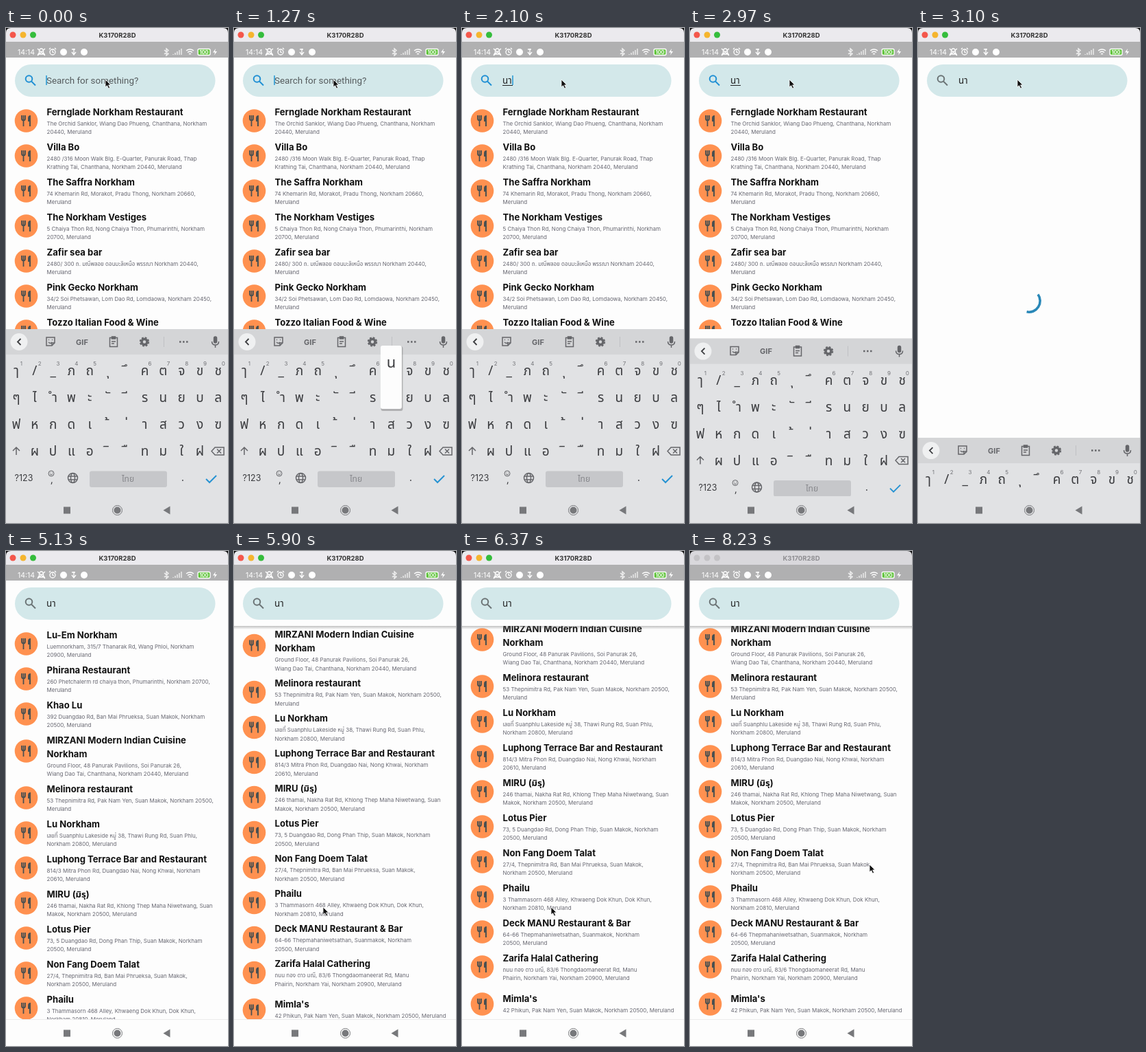
These frames come from a looping animation (324x720 px, 8260 ms). An HTML page:

```html
<!DOCTYPE html>
<html lang="en">
<head>
<meta charset="utf-8">
<title>Restaurant search</title>
<style>
  html, body { margin: 0; width: 100%; height: 100%; overflow: hidden; background: #000; }
  svg { display: block; width: 324px; height: 720px; font-family: Inter, "Noto Sans Thai", "Noto Sans", sans-serif; }
  .name { font-size: 13.1px; font-weight: 700; fill: #111; }
  .addr { font-size: 8px; fill: #666670; }
  .key { font: 19px "Noto Sans Thai", "Noto Sans", sans-serif; fill: #3c3d40; text-anchor: middle; }
  .num { font-size: 8px; fill: #727377; text-anchor: middle; }
  .line { fill: none; stroke: #65666a; stroke-width: 1.5; }
  .field { font: 13.4px Roboto, "Noto Sans Thai", "Noto Sans", sans-serif; }
</style>
</head>
<body>
<svg viewBox="0 0 324 720">
  <defs>
    <clipPath id="aboveKeys"><path d="M0 43H324V438H0z"/></clipPath>
    <clipPath id="aboveNav"><path d="M0 43H324V681H0z"/></clipPath>
    <linearGradient id="fade" x2="0" y2="1"><stop stop-color="#666" stop-opacity=".4"/><stop offset="1" stop-color="#666" stop-opacity="0"/></linearGradient>
    <g id="dish">
      <circle r="16.8" fill="#ff9150"/>
      <path d="M-6.500-8v5q0 2.500 2.500 2.500t2.500-2.500v-5M-4-8V8" fill="none" stroke="#4a5050" stroke-width="1.800"/>
      <path d="M2.500-4q0-4 4-4V8H4.500V1h-2z" fill="#4a5050"/>
    </g>
  </defs>
  <rect width="324" height="720" fill="#fdfdfd"/>
  <g id="first" clip-path="url(#aboveKeys)"></g>
  <g clip-path="url(#aboveNav)"><g id="results"></g></g>
  <path id="spinner" fill="none" stroke="#2a88b8" stroke-width="3.600"/>

  <g id="shadow"><rect y="109" width="324" height="5" fill="url(#fade)"/></g>
  <rect y="43" width="324" height="66" fill="#fdfdfd"/>
  <rect x="13" y="53" width="292.500" height="47" rx="23.500" fill="#d3e8ea"/>
  <g id="lens" fill="none" stroke-width="2"><circle cx="33.500" cy="74" r="4.800"/><path d="M37 77.500l6 6"/></g>
  <text id="query" class="field" x="59" y="81"></text>
  <path id="underline" stroke="#222"/>
  <path id="caret" stroke="#2196d3" stroke-width="1.500" d="M0 69v14"/>

  <rect y="20" width="324" height="23" fill="#b0b0b1"/>
  <g fill="none" stroke="#fff" stroke-width="1.300">
    <path d="M47 38h9l-1.500-2v-3q-.5-3-3-3t-3 3v3zM46 30l11 10M57 30l-11 10"/>
    <circle cx="68" cy="35" r="4"/><path d="M68 32.500V35l2 1M63 31l2-2M73 31l-2-2M99 30v9M96 35l3 4 3-4M96 31h5"/>
    <path d="M231 32l6 5.500-3 2.500V30l3 2.500-6 5.500M244 39v-1M247 39v-3M250 39v-5M253 39v-7M256 39v-9" stroke-opacity=".85"/>
    <path d="M263 33q5.500-4 11 0M265 35.500q3.500-2.500 7 0M267 38q1.500-1 3 0"/>
    <rect x="280" y="30.500" width="18" height="9" rx="2" fill="#62c43e"/>
  </g>
  <g fill="#fff">
    <text x="17" y="38.500" font-size="10.500">14:14</text>
    <circle cx="84" cy="35" r="5"/><circle cx="114" cy="35" r="5"/>
    <text x="289" y="38" font-size="7.500" font-weight="600" text-anchor="middle">100</text>
    <path d="M306 30l-4 5.500h3l-1 4 4-5.500h-3z"/>
  </g>

  <path d="M0 0H324V20H0z" fill="#111"/>
  <path id="bar" d="M0 20V7Q0 0 7 0H317Q324 0 324 7V20z"/>
  <g id="lights"><circle cx="10" cy="10" r="4.500"/><circle cx="25" cy="10" r="4.500"/><circle cx="39.500" cy="10" r="4.500"/></g>
  <text id="device" x="162.500" y="13.500" font-size="9.500" font-weight="700" text-anchor="middle">K3170R28D</text>

  <g id="keyboard">
    <rect y="438" width="324" height="282" fill="#e1e2e4"/>
    <rect y="438" width="324" height="37" fill="#d4d5d7"/>
    <circle cx="19" cy="456.500" r="12.500" fill="#eff0f1"/>
    <g class="line">
      <path d="M21.500 452l-4.500 4.500 4.500 4.500" stroke="#3c3d40" stroke-width="1.800"/>
      <path d="M59 450h12v8l-4 4h-8zM67 462v-4h4M62 457q3 3 5 0M62 453.500h1M67 453.500h1"/>
      <path d="M151.500 450.500h11v13h-11zM154.500 449h5v3h-5zM154 456h6M154 459h4"/>
      <circle cx="202" cy="456.500" r="4" stroke-width="3.500"/><circle cx="202" cy="456.500" r="6.200" stroke-width="2" stroke-dasharray="2.800 2.070"/>
      <path d="M230.500 449v15" stroke="#c0c1c4" stroke-width="1"/>
      <path d="M253 456.500h2.500M258 456.500h2.500M263 456.500h2.500" stroke-width="2.500"/>
      <rect x="303.500" y="449" width="4" height="9" rx="2" fill="#65666a"/><path d="M300.500 456q0 5 5 5t5-5M305.500 461v4"/>
      <path d="M15 621v-11M10 615l5-5 5 5M305 610h13v11h-13l-5-5.500zM308 612.500l6 6M314 612.500l-6 6"/>
      <circle cx="66" cy="648" r="4" stroke-width="1"/><path d="M64 649q2 2 4 0M64.500 646.500v1M67.500 646.500v1" stroke-width="1"/>
      <circle cx="97.500" cy="654.500" r="7"/><ellipse cx="97.500" cy="654.500" rx="3" ry="7"/><path d="M91 652h13M91 657h13"/>
      <path d="M292 656l5 5 10-10" stroke="#2793d2" stroke-width="2"/>
    </g>
    <text x="111" y="460.500" font-size="11" font-weight="700" fill="#65666a" text-anchor="middle">GIF</text>
    <rect x="122" y="644.500" width="113" height="23.500" rx="3" fill="#c6c7ca"/>
    <text x="178" y="660" font-size="12" fill="#85868a" text-anchor="middle">ไทย</text>
    <text x="26" y="659" font-size="12.500" fill="#3c3d40" text-anchor="middle">?123</text>
    <text class="key" x="67" y="662" style="font-size:14px">,</text><text class="key" x="258" y="659" style="font-size:14px">.</text>
    <g id="keys"></g>
  </g>
  <g id="popup">
    <rect x="-15" y="-24" width="32" height="94" rx="3" fill="#555" opacity=".35"/>
    <rect x="-15.500" y="-25" width="31" height="92" rx="3" fill="#fdfdfd"/>
    <text class="key" y="7" style="font-size:22px"></text>
  </g>

  <rect id="nav" y="681" width="324" height="39"/>
  <path id="navLine" d="M0 681.500H324" stroke="#ebebec"/>
  <g fill="#77787b">
    <rect x="84" y="696.500" width="10" height="10"/>
    <circle cx="162.500" cy="701.500" r="5"/><circle cx="162.500" cy="701.500" r="7" fill="none" stroke="#77787b"/>
    <path d="M229.500 701.500l10-6v12z"/>
  </g>
  <path id="pointer" d="M0 0V11l2.600-2.300 2 4.200 2-1-2-4H8z" fill="#111" stroke="#fff" stroke-width=".8"/>
</svg>
<script>
const $ = id => document.getElementById(id);
const LOOP = 8260;
const END = ", Meruland";

// Each entry: name lines split by "|", then address lines.
const firstRows = [
  ["Fernglade Norkham Restaurant", "The Orchid Sanklor, Wiang Dao Phueng, Chanthana, Norkham", "20440" + END],
  ["Villa Bo", "2480 /316 Moon Walk Blg. E-Quarter, Panurak Road, Thap", "Krathing Tai, Chanthana, Norkham 20440" + END],
  ["The Saffra Norkham", "74 Khemarin Rd, Morakot, Pradu Thong, Norkham 20660,", "Meruland"],
  ["The Norkham Vestiges", "5 Chaiya Thon Rd, Nong Chaiya Thon, Phumarinthi, Norkham", "20700" + END],
  ["Zafir sea bar", "2480/ 300 ถ. มณีพลอย ดอนมะลิเหนือ พรรณา Norkham 20440,", "Meruland"],
  ["Pink Gecko Norkham", "34/2 Soi Phetsawan, Lom Dao Rd, Lomdaowa, Norkham 20450,", "Meruland"],
  ["Tozzo Italian Food & Wine", "", ""]
];
const resultRows = [
  ["Lu-Em Norkham", "Luemnorkham, 315/7 Thanarak Rd, Wang Phloi, Norkham", "20900" + END],
  ["Phirana Restaurant", "260 Phetchalerm rd chaiya thon, Phumarinthi, Norkham 20700,", "Meruland"],
  ["Khao Lu", "392 Duangdao Rd, Ban Mai Phrueksa, Suan Makok, Norkham", "20500" + END],
  ["MIRZANI Modern Indian Cuisine|Norkham", "Ground Floor, 48 Panurak Pavilions, Soi Panurak 26,", "Wiang Dao Tai, Chanthana, Norkham 20440" + END],
  ["Melinora restaurant", "53 Thepnimitra Rd, Pak Nam Yen, Suan Makok, Norkham 20500,", "Meruland"],
  ["Lu Norkham", "เลขที่ Suanphlu Lakeside หมู่ 38, Thawi Rung Rd, Suan Phlu,", "Norkham 20800" + END],
  ["Luphong Terrace Bar and Restaurant", "814/3 Mitra Phon Rd, Duangdao Nai, Nong Khwai, Norkham", "20610" + END],
  ["MIRU (มิรุ)", "246 thamai, Nakha Rat Rd, Khlong Thep Maha Niwetwang, Suan", "Makok, Norkham 20500" + END],
  ["Lotus Pier", "73, 5 Duangdao Rd, Dong Phan Thip, Suan Makok, Norkham", "20500" + END],
  ["Non Fang Doem Talat", "27/4, Thepnimitra Rd, Ban Mai Phrueksa, Suan Makok,", "Norkham 20500" + END],
  ["Phailu", "3 Thammasorn 468 Alley, Khwaeng Dok Khun, Dok Khun,", "Norkham 20810" + END],
  ["Deck MANU Restaurant & Bar", "64-66 Thepmahaniwetsathan, Suanmakok, Norkham", "20500" + END],
  ["Zarifa Halal Cathering", "ถนน ทอง ดาว มณี, 83/6 Thongdaomaneerat Rd, Manu", "Phairin, Norkham Yai, Norkham 20900" + END],
  ["Mimla's", "42 Phikun, Pak Nam Yen, Suan Makok, Norkham 20500" + END]
];

const text = (cls, x, y, s) => `<text class="${cls}" x="${x}" y="${y}">${s.replace("&", "&amp;")}</text>`;

function list(rows) {
  let y = 122;
  return rows.map(([name, ...addr]) => {
    const names = name.split("|"), extra = names.length > 1 ? 20 : 0, single = addr.length < 2;
    if (single) y += 8;
    const out = `<use href="#dish" x="29.5" y="${y + (single ? 8 : extra ? 16 : 13)}"/>` +
      names.map((s, i) => text("name", 59.5, y + 4.5 + 20 * i, s)).join("") +
      addr.map((s, i) => text("addr", 59.5, y + extra + 19.5 + 12.5 * i, s)).join("");
    y += 51 + extra;
    return out;
  }).join("");
}
$("first").innerHTML = list(firstRows);
$("results").innerHTML = list(resultRows);

// A no-break space carries the marks that need a base letter.
const keyRows = ["ๅ / _ ภ ถ ุ ึ ค ต จ ข ช", "ๆ ไ ำ พ ะ ั ี ร น ย บ ล", "ฟ ห ก ด เ ้ ่ า ส ว ง ฃ", "- ผ ป แ อ ิ ื ท ม ใ ฝ -"];
const keyX = i => 15 + 26.8 * i;
$("keys").innerHTML = keyRows.map((row, r) => row.split(" ").map((c, i) =>
  c == "-" ? "" : text("key", keyX(i), 505 + 39 * r, /[ัำ-ฺ็-๎]/.test(c) ? "\u00a0" + c : c)).join("")).join("") +
  [..."1234567890"].map((n, i) => text("num", keyX(i < 5 ? i : i + 2) + 7.5, 491, n)).join("");

const clamp = v => Math.min(1, Math.max(0, v));
const smooth = v => v * v * (3 - 2 * v);
const show = (id, on) => $(id).setAttribute("visibility", on ? "visible" : "hidden");

// cubic-bezier(.4, 0, .2, 1)
function fastOutSlowIn(x) {
  let lo = 0, hi = 1, s;
  for (let i = 0; i < 20; i++) {
    s = (lo + hi) / 2;
    if (1.2 * s * (1 - s) ** 2 + .6 * s * s * (1 - s) + s ** 3 < x) lo = s; else hi = s;
  }
  return 3 * s * s * (1 - s) + s ** 3;
}

function spinnerPath(ms) {
  const p = ms / 1333 % 1, turn = Math.PI * 1.5, r = 16.2;
  const head = fastOutSlowIn(clamp(p * 2)), tail = fastOutSlowIn(clamp(p * 2 - 1));
  const a = -Math.PI / 2 + tail * turn + ms / 2222 * Math.PI * 2 + p * Math.PI / 2;
  const sweep = Math.max((head - tail) * turn, .02);
  const at = q => `${162 + r * Math.cos(q)} ${397 + r * Math.sin(q)}`;
  return `M${at(a)}A${r} ${r} 0 ${sweep > Math.PI ? 1 : 0} 1 ${at(a + sweep)}`;
}

const pointerStops = [[0, 145, 75], [3370, 145, 75], [3750, -15, 700], [5150, 130, 725], [5300, 130, 518],
  [6950, 130, 518], [7600, 262, 456], [LOOP, 262, 456]];

function pointerAt(t) {
  const i = pointerStops.findIndex(s => s[0] > t), [t0, x0, y0] = pointerStops[i - 1], [t1, x1, y1] = pointerStops[i];
  const u = smooth((t - t0) / (t1 - t0));
  return [x0 + (x1 - x0) * u, y0 + (y1 - y0) * u];
}

const presses = [["น", 1230, 8, 487], ["า", 1560, 7, 526]];
const BLUR = 2910, LOADING = 3000, LOADED = 4470;
const SPIN_START = 2865, SPIN_STALL = 1215; // the spinner stalls while the list is built

function draw(t) {
  const typed = presses.filter(p => t >= p[1] + 100), word = typed.map(p => p[0]).join("");
  const typing = t < BLUR, active = t < LOADING;
  $("query").textContent = word || "Search for something?";
  $("query").setAttribute("fill", word ? "#222" : "#555b5d");
  $("lens").setAttribute("stroke", active ? "#2190d4" : "#6c7476");
  show("underline", word && active);
  $("underline").setAttribute("d", `M59 83.5h${word.length * 7.5}`);
  const since = t - (typed.length ? typed.at(-1)[1] + 100 : 0);
  show("caret", typing && since % 1000 < 500);
  $("caret").setAttribute("transform", `translate(${59 + word.length * 7.5})`);

  const pressed = presses.find(p => t >= p[1] && t < p[1] + 110);
  show("popup", pressed);
  if (pressed) {
    $("popup").setAttribute("transform", `translate(${keyX(pressed[2])} ${pressed[3]})`);
    $("popup").lastElementChild.textContent = pressed[0];
  }
  const drop = clamp((t - BLUR) / 250);
  $("keyboard").setAttribute("transform", `translate(0 ${282 * drop ** 2.15})`);
  $("nav").setAttribute("fill", drop < 1 ? "#e1e2e4" : "#fdfdfd");
  show("navLine", drop == 1);

  show("first", active);
  show("spinner", !active && t < LOADED);
  $("spinner").setAttribute("d", spinnerPath(Math.min(t - SPIN_START, SPIN_STALL)));
  show("results", t >= LOADED);
  const scroll = 162 * (1 - (1 - clamp((t - 5300) / 780)) ** 2);
  $("results").setAttribute("transform", `translate(0 ${-scroll})`);
  show("shadow", scroll > 0);

  const focused = t < 7400;
  $("bar").setAttribute("fill", focused ? "#ebeaee" : "#d9d8dc");
  $("device").setAttribute("fill", focused ? "#333" : "#8f8e92");
  ["#f4574b", "#f5b52e", "#35bd3c"].forEach((c, i) =>
    $("lights").children[i].setAttribute("fill", focused ? c : "#c3c2c5"));
  $("pointer").setAttribute("transform", `translate(${pointerAt(t)})`);
  show("pointer", t < 3750 || t >= 5150);
}

function frame() {
  draw(performance.now() % LOOP);
  requestAnimationFrame(frame);
}
frame();
</script>
</body>
</html>
```
